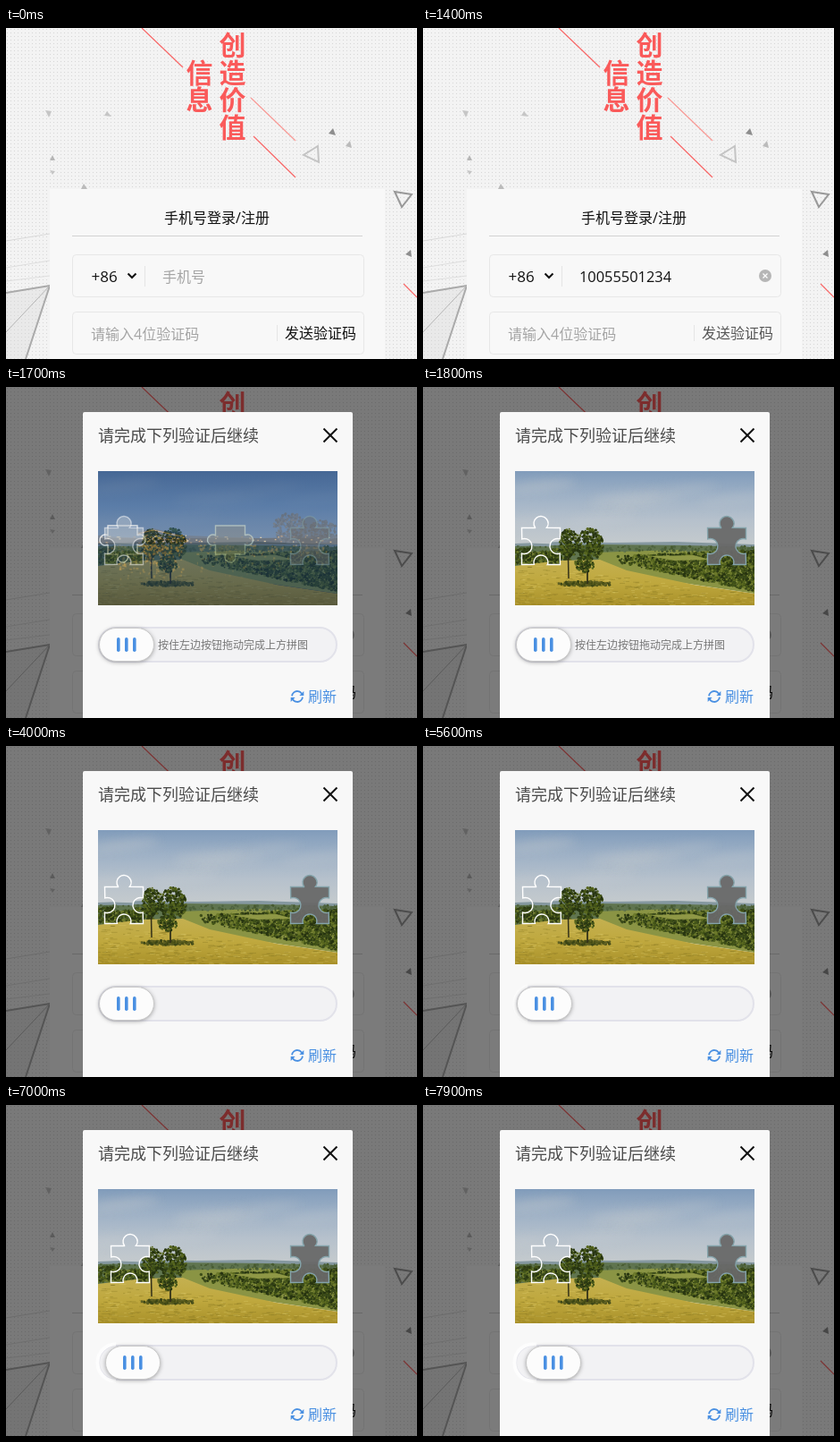
Recreate the animation shown at these times as an HTML page with a canvas. Size 460x370 px, loop 8 s.

```html
<!DOCTYPE html>
<html lang="zh-CN">
<head>
<meta charset="utf-8">
<title>登录验证</title>
<style>
  html, body { margin: 0; width: 100%; height: 100%; overflow: hidden; background: #f3f3f3; }
  canvas { display: block; width: 460px; height: 370px; }
</style>
</head>
<body>
<canvas id="stage" width="460" height="370"></canvas>
<script>
const W = 460, H = 370, LOOP = 8000;
const FONT = '"Open Sans", "Noto Sans CJK SC", "Noto Sans CJK", sans-serif';
const BLUE = '#4a90e2';
const DRAG_STEPS = [5600, 5900, 6100, 6300, 6600, 6800, 7000, 7200, 7500, 7700, 7900];
const PHOTO = { x: 103, y: 94, w: 268, h: 150 };
const stage = document.getElementById('stage').getContext('2d');

function layer(w, h, draw) {
  const canvas = document.createElement('canvas');
  canvas.width = w;
  canvas.height = h;
  draw(canvas.getContext('2d'));
  return canvas;
}

function seeded(seed) {
  return () => (seed = (seed * 16807) % 2147483647) / 2147483647;
}

function text(c, str, x, middle, size, color, weight = 400) {
  c.font = `${weight} ${size}px ${FONT}`;
  c.fillStyle = color;
  c.fillText(str, x, Math.round(middle + size * 0.37));
}

function line(c, color, width, ...pts) {
  c.beginPath();
  for (let i = 0; i < pts.length; i += 2) c.lineTo(pts[i], pts[i + 1]);
  c.strokeStyle = color;
  c.lineWidth = width;
  c.stroke();
}

function poly(c, color, ...pts) {
  c.beginPath();
  for (let i = 0; i < pts.length; i += 2) c.lineTo(pts[i], pts[i + 1]);
  c.closePath();
  c.fillStyle = color;
  c.fill();
}

function pill(c, x, y, w, h, r, fill, stroke, width = 1) {
  c.beginPath();
  c.roundRect(x, y, w, h, r);
  if (fill) { c.fillStyle = fill; c.fill(); }
  if (stroke) { c.strokeStyle = stroke; c.lineWidth = width; c.stroke(); }
}

function gradient(c, y0, y1, ...colors) {
  const g = c.createLinearGradient(0, y0, 0, y1);
  colors.forEach((color, i) => g.addColorStop(i / (colors.length - 1), color));
  return g;
}

function band(c, y0, y1, ...colors) {
  c.fillStyle = gradient(c, y0, y1, ...colors);
  c.fillRect(0, y0, PHOTO.w, y1 - y0);
}

function leaf(c, rnd, x, y, colors) {
  c.fillStyle = colors[Math.floor(rnd() * colors.length)];
  c.beginPath();
  c.arc(x, y, 0.7 + rnd() * 1.1, 0, 7);
  c.fill();
}

// Leaves scattered inside an ellipse
function foliage(c, rnd, cx, cy, rx, ry, count, colors) {
  for (let i = 0; i < count; i++) {
    const a = rnd() * Math.PI * 2, d = Math.sqrt(rnd());
    leaf(c, rnd, cx + Math.cos(a) * d * rx, cy + Math.sin(a) * d * ry, colors);
  }
}

const nightPhoto = layer(PHOTO.w, PHOTO.h, c => {
  const rnd = seeded(71);
  band(c, 0, 78, '#0b3470', '#0d4287', '#28548c');
  band(c, 78, 150, '#234066', '#123260', '#0a2450');
  poly(c, '#293b58', 0, 72, 40, 68, 62, 64, 95, 72, 180, 75, 268, 72, 268, 80, 0, 80);
  c.fillStyle = '#1b2433';
  c.fillRect(0, 75, 268, 7);
  foliage(c, rnd, 215, 64, 19, 17, 260, ['#26334a', '#1c2739', '#333c4c']);
  foliage(c, rnd, 252, 67, 16, 12, 160, ['#26334a', '#1c2739']);
  for (let i = 0; i < 170; i++) {
    const x = i < 100 ? 15 + rnd() * 85 : rnd() * 265;
    c.fillStyle = ['#e9a957', '#c17d3c', '#f4d090', '#8c6040'][Math.floor(rnd() * 4)];
    c.fillRect(x, 71 + rnd() * 9, 1 + rnd() * 1.5, 1.3);
  }
  line(c, '#d7a05c', 1, 40, 71, 62, 66, 94, 73);
  for (let i = 0; i < 420; i++) {
    const near = i < 260;
    const x = near ? 22 + rnd() * 72 : 110 + rnd() * 150;
    const depth = rnd() * rnd();
    c.fillStyle = `rgba(225,160,95,${(near ? 0.75 : 0.5) * (1 - depth)})`;
    c.fillRect(x, 82 + depth * (near ? 50 : 40), 1 + rnd() * 2, 1 + rnd() * 2);
  }
});

const fieldPhoto = layer(PHOTO.w, PHOTO.h, c => {
  const rnd = seeded(29);
  const greens = ['#2f3d15', '#435418', '#58671f', '#263310'];
  const mixed = [...greens, '#6d7a2c', '#3a4a1a'];

  band(c, 0, 82, '#819cbb', '#9eb1c6', '#b6c1cc', '#c4cacd');
  c.filter = 'blur(6px)';
  for (let i = 0; i < 9; i++) {
    c.fillStyle = 'rgba(214,214,212,.25)';
    c.beginPath();
    c.ellipse(rnd() * 268, 15 + rnd() * 55, 40, 4, -0.12, 0, 7);
    c.fill();
  }
  c.filter = 'none';

  poly(c, '#8598a0', 0, 81, 50, 79, 110, 80, 180, 79, 268, 82, 268, 95, 0, 95);
  poly(c, '#60754f', 0, 84, 90, 82, 190, 83, 268, 85, 268, 110, 0, 110);
  poly(c, '#8a9444', 90, 91, 180, 88, 268, 92, 268, 137, 100, 112);
  for (let i = 0; i < 260; i++) leaf(c, rnd, rnd() * 268, 84 + rnd() * 6, ['#4e633f', '#5f7350', '#475a30']);
  for (let i = 0; i < 420; i++) leaf(c, rnd, rnd() * 62, 87 + rnd() * 17, mixed);

  c.beginPath();
  for (const [x, y] of [[0, 106], [50, 100], [95, 99], [125, 111], [200, 127], [268, 137], [268, 150], [0, 150]]) c.lineTo(x, y);
  c.fillStyle = gradient(c, 99, 150, '#c4b050', '#bfa83e', '#a9912a');
  c.fill();

  // Hedge widening towards the right edge
  for (let i = 0; i < 2000; i++) {
    const x = 110 + 160 * Math.sqrt(rnd());
    const top = 95 - (x - 110) * 0.04, bottom = 101 + (x - 110) * 0.21;
    leaf(c, rnd, x, top + rnd() * (bottom - top), mixed);
  }
  poly(c, '#8f9846', 150, 95, 200, 94, 218, 99, 178, 100);

  for (let i = 0; i < 600; i++) {
    const x = rnd() * 268, y = 106 + rnd() * 44;
    if (y < 103 + x * 0.13) continue;
    c.fillStyle = rnd() < 0.55 ? 'rgba(128,112,30,.4)' : 'rgba(220,202,108,.4)';
    c.fillRect(x, y, 2 + rnd() * 6, 0.8);
  }
  foliage(c, rnd, 80, 126, 32, 2.5, 170, ['#4d5218', '#5f6023', '#3c4516']);
  line(c, '#343219', 1.5, 59, 75, 60, 120);
  line(c, '#343219', 1.8, 81, 80, 81, 126);
  foliage(c, rnd, 61, 80, 11, 16, 210, greens);
  foliage(c, rnd, 84, 82, 15, 18, 290, greens);
  foliage(c, rnd, 78, 104, 11, 9, 100, greens);
});

function nightPiece(x) {
  const p = new Path2D();
  p.moveTo(x, 155);
  p.lineTo(x + 33, 155);
  p.lineTo(x + 33, 166);
  p.arc(x + 36, 171, 6, -2.1, 2.1);
  p.lineTo(x + 33, 187);
  p.lineTo(x + 22, 187);
  p.arc(x + 16.5, 190, 6, -0.5, Math.PI + 0.5);
  p.lineTo(x, 187);
  p.lineTo(x, 176);
  p.arc(x - 3, 171, 6, 1.05, -1.05);
  p.closePath();
  return p;
}

function fieldPiece(x) {
  const p = new Path2D();
  p.moveTo(x, 157.5);
  p.lineTo(x + 15, 157.5);
  p.arc(x + 21.5, 152.5, 8, 2.5, 0.64);
  p.lineTo(x + 43, 157.5);
  p.lineTo(x + 43, 170);
  p.arc(x + 40, 178, 8.5, -1.25, 1.25, true);
  p.lineTo(x + 43, 198.5);
  p.lineTo(x + 29, 198.5);
  p.arc(x + 21.5, 196, 8, 0.3, Math.PI - 0.3, true);
  p.lineTo(x, 198.5);
  p.lineTo(x, 186);
  p.arc(x + 3, 178, 8.5, 1.9, -1.9, true);
  p.closePath();
  return p;
}

function puzzle(c, photo, shape, from, to, hole, rim) {
  c.drawImage(photo, PHOTO.x, PHOTO.y);
  const target = shape(to), piece = shape(from);
  c.fillStyle = hole;
  c.fill(target);
  c.lineWidth = 1.4;
  c.strokeStyle = rim;
  c.stroke(target);
  c.save();
  c.clip(piece);
  c.drawImage(photo, PHOTO.x + from - to, PHOTO.y);
  c.restore();
  c.strokeStyle = '#fff';
  c.stroke(piece);
}

const backdrop = layer(W, H, c => {
  c.fillStyle = '#f3f3f3';
  c.fillRect(0, 0, W, H);
  poly(c, '#e9e9e9', 0, 296, 49, 288, 22, 370, 0, 370);
  c.fillStyle = '#d6d6d6';
  for (let y = 1; y < H; y += 4)
    for (let x = 1; x < W; x += 4) c.fillRect(x, y, 1, 1);

  line(c, '#d9d9d9', 1, 0, 238, 49, 230);
  line(c, '#dedede', 1, 0, 268, 49, 260);
  line(c, '#dedede', 1, 0, 283, 49, 277);
  line(c, '#aaa', 2, 0, 296, 49, 288, 22, 370);
  line(c, '#b5b5b5', 1, 0, 340, 49, 288);
  line(c, '#c4c4c4', 2, 333, 142, 349, 132, 350, 150, 333, 142, 349, 132);
  line(c, '#999', 2, 435, 183, 454, 186, 443, 200, 435, 183, 454, 186);
  poly(c, '#8e8e8e', 361, 118, 366, 112, 369, 120);
  poly(c, '#bbb', 380, 132, 385, 126, 387, 134);
  poly(c, '#c6c6c6', 110, 98, 113, 93, 118, 99);
  poly(c, '#c6c6c6', 44, 92, 51, 93, 48, 100);
  poly(c, '#b6b6b6', 49, 148, 52, 142, 55, 148);
  poly(c, '#c6c6c6', 49, 159, 55, 160, 52, 164);
  poly(c, '#bbb', 84, 180, 87, 174, 91, 180);
  poly(c, '#8e8e8e', 447, 253, 453, 248, 454, 256);

  const red = '#f96666';
  line(c, red, 1.2, 152, 0, 198, 44);
  line(c, '#f99a96', 1.2, 274, 78, 324, 126);
  line(c, red, 1.2, 277, 121, 324, 167);
  line(c, red, 1.2, 445, 286, 460, 301);
  [...'创造价值'].forEach((ch, i) => text(c, ch, 238.5, 19 + i * 30.6, 30, '#fa5a5a', 900));
  [...'信息'].forEach((ch, i) => text(c, ch, 201.5, 50 + i * 30.2, 30, '#fa5a5a', 900));
});

function chevron(c) {
  line(c, '#111', 2, 136.5, 274.5, 141, 279, 145.5, 274.5);
}

function clearIcon(c) {
  c.fillStyle = '#b6b6b6';
  c.beginPath();
  c.arc(383, 277, 7, 0, 7);
  c.fill();
  line(c, '#fff', 1.3, 380.5, 274.5, 385.5, 279.5);
  line(c, '#fff', 1.3, 385.5, 274.5, 380.5, 279.5);
}

function loginPage(c, t) {
  c.drawImage(backdrop, 0, 0);
  c.fillStyle = '#f8f8f8';
  c.fillRect(49, 180, 375, 190);
  text(c, '手机号登录/注册', 177, 212, 16, '#111');
  line(c, '#d2d2d2', 1, 74, 232.5, 399, 232.5);
  pill(c, 74.5, 253.5, 326, 47, 4, '#f8f8f8', '#e7e7e7');
  pill(c, 74.5, 317.5, 326, 47, 4, '#f8f8f8', '#e7e7e7');
  line(c, '#e5e5e5', 1, 155.5, 266, 155.5, 289);
  line(c, '#e5e5e5', 1, 303.5, 332, 303.5, 350);
  text(c, '+86', 95.5, 278, 17, '#111');
  chevron(c);

  if (t < 1100) {
    text(c, '手机号', 175, 278, 16, '#a5a5a5');
  } else {
    text(c, '10055501234', 175, 278, 16.4, '#111');
    clearIcon(c);
    if (t < 1400) line(c, '#111', 1, 278.5, 267, 278.5, 288);
  }
  text(c, '请输入4位验证码', 95, 342, 16, '#a5a5a5');
  const hovered = t >= 1200 && t < 1600;
  text(c, '发送验证码', 312, 341, 16, hovered ? '#555' : '#111');
}

function refreshIcon(c) {
  c.lineCap = 'butt';
  for (const turn of [0, Math.PI]) {
    c.save();
    c.translate(326, 346);
    c.rotate(turn);
    c.beginPath();
    c.arc(0, 0, 6, Math.PI + 0.1, -0.5);
    c.strokeStyle = BLUE;
    c.lineWidth = 1.8;
    c.stroke();
    poly(c, BLUE, 7.3, -6, 7.3, -1, 2.3, -1);
    c.restore();
  }
}

function slider(c, t, shift) {
  pill(c, 104, 269, 266, 38, 19, '#f2f2f4', '#e2e2ea', 2);
  if (t < 4000) text(c, '按住左边按钮拖动完成上方拼图', 170, 288.5, 12, '#777');
  const x = 104 + shift;
  if (shift) {
    c.save();
    c.beginPath();
    c.rect(96, 262, shift + 20, 50);
    c.clip();
    pill(c, 102.5, 267.5, 64, 41, 20, null, '#fdfdfd', 4);
    c.restore();
  }
  c.save();
  c.shadowColor = 'rgba(0,0,0,.38)';
  c.shadowBlur = 5;
  c.shadowOffsetY = 1;
  pill(c, x + 0.5, 269.5, 61, 37, 18.5, '#fff');
  c.restore();
  pill(c, x + 0.5, 269.5, 61, 37, 18.5, '#fcfcfc', '#c9c9c9');
  for (const dx of [20, 29, 38]) pill(c, x + dx, 280, 3.6, 16, 1.8, BLUE);
}

function dialog(c, t) {
  c.fillStyle = 'rgba(0,0,0,.5)';
  c.fillRect(0, 0, W, H);
  pill(c, 86, 28, 302, 346, 2, '#f8f8f8');
  text(c, '请完成下列验证后继续', 103, 54, 18, '#4a4a4a');
  line(c, '#111', 2, 355.5, 46.5, 370.5, 61.5);
  line(c, '#111', 2, 370.5, 46.5, 355.5, 61.5);

  // The second picture fades in over the first in ticks of 100 ms
  const shift = DRAG_STEPS.filter(step => t >= step).length;
  const fade = Math.min(1, Math.floor((t - 1600) / 100) / 2);
  if (fade < 1) puzzle(c, nightPhoto, nightPiece, 114, 234.5, 'rgba(75,82,80,.6)', '#9fb5ae');
  c.globalAlpha = fade;
  puzzle(c, fieldPhoto, fieldPiece, 110.5 + shift, 318.5, 'rgba(105,105,105,.94)', '#84a3aa');
  c.globalAlpha = 1;

  slider(c, t, shift);
  refreshIcon(c);
  text(c, '刷新', 338, 346, 16, BLUE);
}

function frame(now) {
  const t = now % LOOP;
  loginPage(stage, t);
  if (t >= 1600) dialog(stage, t);
  requestAnimationFrame(frame);
}

requestAnimationFrame(frame);
</script>
</body>
</html>
```
